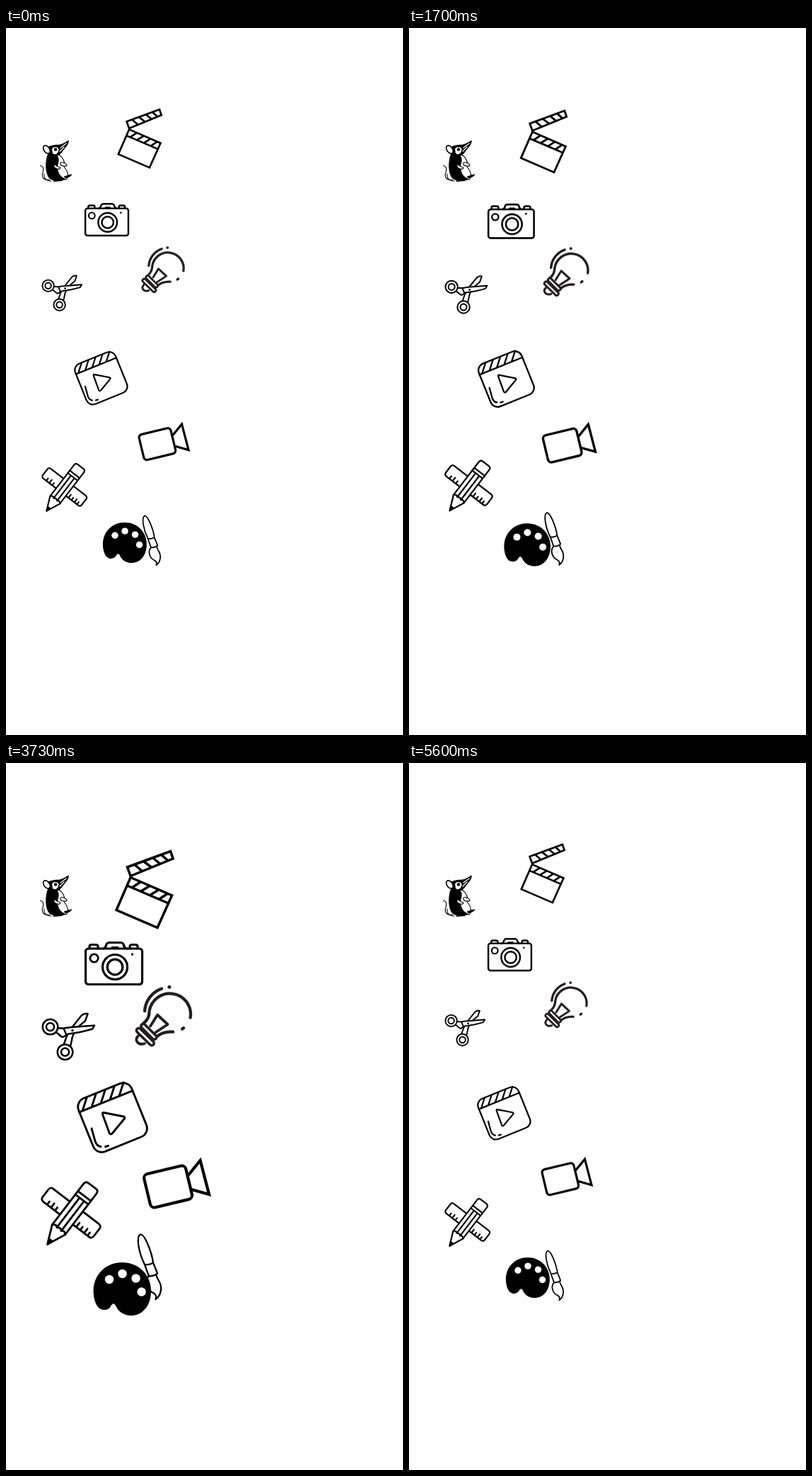
These frames come from a looping animation (561 px wide and 998 px high, 6.41 s). An HTML page:

```html
<!DOCTYPE html>
<html lang="en">
<head>
<meta charset="utf-8">
<title>Creative tools</title>
<style>
  html, body { margin: 0; width: 100%; height: 100%; overflow: hidden; background: #fff; }
  svg { display: block; width: 561px; height: 998px; }
  .ink { fill: #000; stroke: none; }
  .paper { fill: #fff; stroke: none; }
  .round { stroke-linecap: round; stroke-linejoin: round; }
</style>
</head>
<body>
<svg viewBox="0 0 561 998" fill="none" stroke="#000" stroke-width="3.200">

  <g id="shrew" class="round" stroke-width="1.1">
    <path d="M62 214C52 216 50 209 52 204C54 198 52 194 48.5 194.5M64 216C55 216 53 210 54 206"/>
    <path class="ink" d="M59 178C55 188 55 205 61 212C66 217 78 217 84 214C78 205 75 199 77 187C78 182 76 177 73 174L60 172Z"/>
    <path fill="#fff" d="M75 179C81 183 84 190 82 196C88 203 89 210 85 214C75 211 71 202 73 192C75 187 74 183 72 180Z"/>
    <path class="ink" d="M58 169C62 165 70 165 76 164.5C82 163 85 160 88.500 158.500C90 163 84 169 80 174C77 180 68 183 61 179Z"/>
    <ellipse cx="57.500" cy="171.500" rx="4" ry="6.300" fill="#fff" stroke-width="1.700" transform="rotate(-35 57.500 171.500)"/>
    <path class="paper" d="M65 171C66 167 73 167 74.500 171C74 177 70 180 66 177Z"/>
    <circle class="ink" cx="70" cy="171.500" r="2.200"/>
    <path stroke="#fff" stroke-width="1.300" d="M77 169L85 163M76 174L82 168"/>
    <path fill="#fff" d="M77 190C81 189 85 191 86 194C84 196 79 195 77 193ZM68 191C70 195 74 196 77 197C77 200 71 200 68 196Z"/>
    <path class="ink" d="M67 214C73 212 79 213 79 216L67 217ZM82 209C86 209 89 206 93.500 206.500C92 210 87 212 83 212Z"/>
  </g>

  <g id="clapper" stroke-width="3.500">
    <path d="M171.500 147L232.500 124.500L236 135L176 159.500Z"/>
    <path d="M181 143L193 153M194 138.500L206 147.500M207 133.500L218 142.500M219 129L229 138"/>
    <path d="M176 161.500L234.500 187L214 232.500L156 207.500ZM171 173L229.500 198"/>
    <path d="M178 176L190 168M190 181.500L203 173.500M203 187L215.500 179M216 192.500L228 184.500"/>
  </g>

  <g id="camera" class="round">
    <rect x="112.500" y="262" width="80" height="50.500" rx="4"/>
    <path d="M137 262C140 262 141 260 142 256C143 253.500 144 253.500 146 253.500H162C164 253.500 165 253.500 166 256C167 260 168 262 171 262M150 260.500H158"/>
    <path d="M118 262V259Q118 256.500 121 256.500H127Q130 256.500 130 259V262M175 262V259Q175 256.500 178 256.500H183Q186 256.500 186 259V262"/>
    <circle cx="154" cy="288" r="17.500"/>
    <circle cx="154" cy="288" r="10.800"/>
    <circle cx="124.500" cy="275.500" r="5.700" stroke-width="2.800"/>
    <circle class="ink" cx="178.500" cy="270" r="1.700"/>
  </g>

  <g id="bulb" class="round" stroke="#231f20" stroke-width="4.300">
    <path d="M194 368C201 362 202.500 357 202.500 350A29.200 29.200 0 0 1 260.500 359.500"/>
    <path d="M196 350A36 36 0 0 1 220 318.500M249 375.500L251 374M236 379.500C228 379 220 380 212 387"/>
    <circle cx="230.800" cy="316.300" r="2.500" fill="#231f20" stroke="none"/>
    <path stroke-width="3.800" d="M204 371.500L214 355.500L228.500 369L211 380.500"/>
    <path stroke-width="3.800" d="M187 385C181 391 186 399 196 396"/>
    <g stroke-width="10">
      <path d="M187.500 377.500L206 395.500M194 371.500L209.500 387"/>
      <path stroke="#fff" stroke-width="2.800" d="M187.500 377.500L206 395.500M194 371.500L209.500 387"/>
    </g>
  </g>

  <g id="scissors" class="round" stroke-width="2.500">
    <path fill="#fff" d="M81 399L86 385L91 376L107 356Q111 353 115.500 354L112 364L99 375L94 386L91 400Z"/>
    <path fill="#fff" d="M70 373C76 375 80 375 84 374L92 373L125 370.500L122 375.500Q113 378 104 380L88 382.500L80 387C76 386 74 381 70 380Z"/>
    <g fill="#fff">
      <circle cx="62.500" cy="372.500" r="10.800"/>
      <circle cx="62.500" cy="372.500" r="5.600"/>
      <circle cx="83.500" cy="408" r="10.800"/>
      <circle cx="83.500" cy="408" r="5.600"/>
    </g>
    <path d="M82 376L86 385"/>
    <circle class="ink" cx="94" cy="377.500" r="1.800"/>
  </g>

  <g id="player" class="round" stroke-width="2.900">
    <g transform="translate(150.500 500.500) rotate(-22)">
      <rect x="-40.500" y="-40.500" width="81" height="81" rx="13"/>
      <path d="M-40.500 -24.500H40.500M-36 -24.500L-23 -40M-22 -24.500L-9 -40M-8 -24.500L5 -40M6 -24.500L19 -40M20 -24.500L33 -40"/>
    </g>
    <path d="M138 493.500L166 499Q169 500 167 502.500L150 523Q147.500 525.500 146 522L136.500 496Q136 493 138 493.500Z"/>
    <path d="M121 516L126 534Q128.500 541 134 541.500M140.500 541.500L144.500 540.300"/>
  </g>

  <g id="video" stroke-width="4.200">
    <rect x="-30.300" y="-24.300" width="60.600" height="48.600" rx="6" transform="translate(229 598) rotate(-13.500)"/>
    <path d="M257.500 582L274.500 561L287 609L262 602"/>
  </g>

  <g id="drafting" class="round" stroke-width="2.800">
    <g transform="translate(92 635) rotate(37.500)">
      <rect x="-45.500" y="-11.500" width="91" height="23" rx="4.500"/>
      <path d="M-34 11V6M-27 11V4M-20 11V6M18 11V4M25 11V6M32 11V4M38 11V6"/>
    </g>
    <g transform="translate(58.500 679.500) rotate(37.500)">
      <path fill="#fff" d="M0 0L-11.500 -26V-99Q-11.500 -104 -6.500 -104H6.500Q11.500 -104 11.500 -99V-26Z"/>
      <path d="M-11.500 -86H11.500M-11.500 -80H11.500M-4 -28V-80M4 -28V-80M-11.500 -26Q-7.500 -31 -4 -27Q0 -31 4 -27Q7.500 -31 11.500 -26"/>
      <path class="ink" d="M0 0L-4 -9H4Z"/>
    </g>
  </g>

  <g id="brush" class="round" stroke-width="2.300">
    <path d="M196 708C187 690 184 669 189.500 665.500C196 664 206 691 208 705.500Q202 709 196 708L202 725Q209 725 214 720.500L208 705.500"/>
    <path fill="#fff" d="M202 724C195 731 199 744 208 748C212 750 213 753 211.500 757C220 751 221 739 216 731Q213 726 212 722Q207 725 202 724Z"/>
  </g>

  <g id="palette">
    <path class="ink" d="M123.500 745C124 722 141 705 164 705C188 705 205 723 205 745C205 766 193 780 177 780C166 780 159 774 156 768C153 762 151 762 148 767C145 773 135 774 130 768C126 763 123.500 755 123.500 745Z"/>
    <g class="paper">
      <circle cx="146" cy="729" r="6.200"/>
      <circle cx="164.500" cy="721" r="6.200"/>
      <circle cx="183.500" cy="727.500" r="6.200"/>
      <circle cx="191.500" cy="746.500" r="6.200"/>
    </g>
  </g>
</svg>

<script>
const LOOP = 6410, BEAT = 1600, PEAK = 17, END = 24;
const REST = 0.76;        // resting scale of the drawn size
const DRAWN = 16 / PEAK;  // swell at which icons have their drawn size

// Resting offset of each icon, reached at scale REST
const offsets = {
  clapper: [40.2, 20.4],
  camera: [26.6, 55.5],
  bulb: [52.8, 69.7],
  scissors: [12.1, 80.7],
  player: [20, 114],
  video: [39.8, 132.8],
  drafting: [12.8, 165.4],
  brush: [51.6, 182.9],
  palette: [43, 162.2]
};
const icons = Object.entries(offsets).map(([id, [x, y]]) => ({ el: document.getElementById(id), x, y }));

// 30 steps a second, on a 10 ms clock
function stepAt(ms) {
  const k = Math.round(ms * 0.03);
  return Math.round(k * 10 / 3) * 10 > ms ? k - 1 : k;
}

// Steady growth, then a quick fall that eases out
function swell(k) {
  if (k <= PEAK) return k / PEAK;
  if (k >= END) return 0;
  return (1 - (k - PEAK) / (END - PEAK)) ** 6;
}

function draw(ms) {
  const q = swell(stepAt(ms % LOOP % BEAT)) / DRAWN;
  const scale = REST + (1 - REST) * q;
  for (const { el, x, y } of icons) {
    el.setAttribute('transform', `translate(${x * (1 - q)} ${y * (1 - q)}) scale(${scale})`);
  }
}

const start = performance.now();
function tick() {
  draw(performance.now() - start);
  requestAnimationFrame(tick);
}
tick();
</script>
</body>
</html>
```
